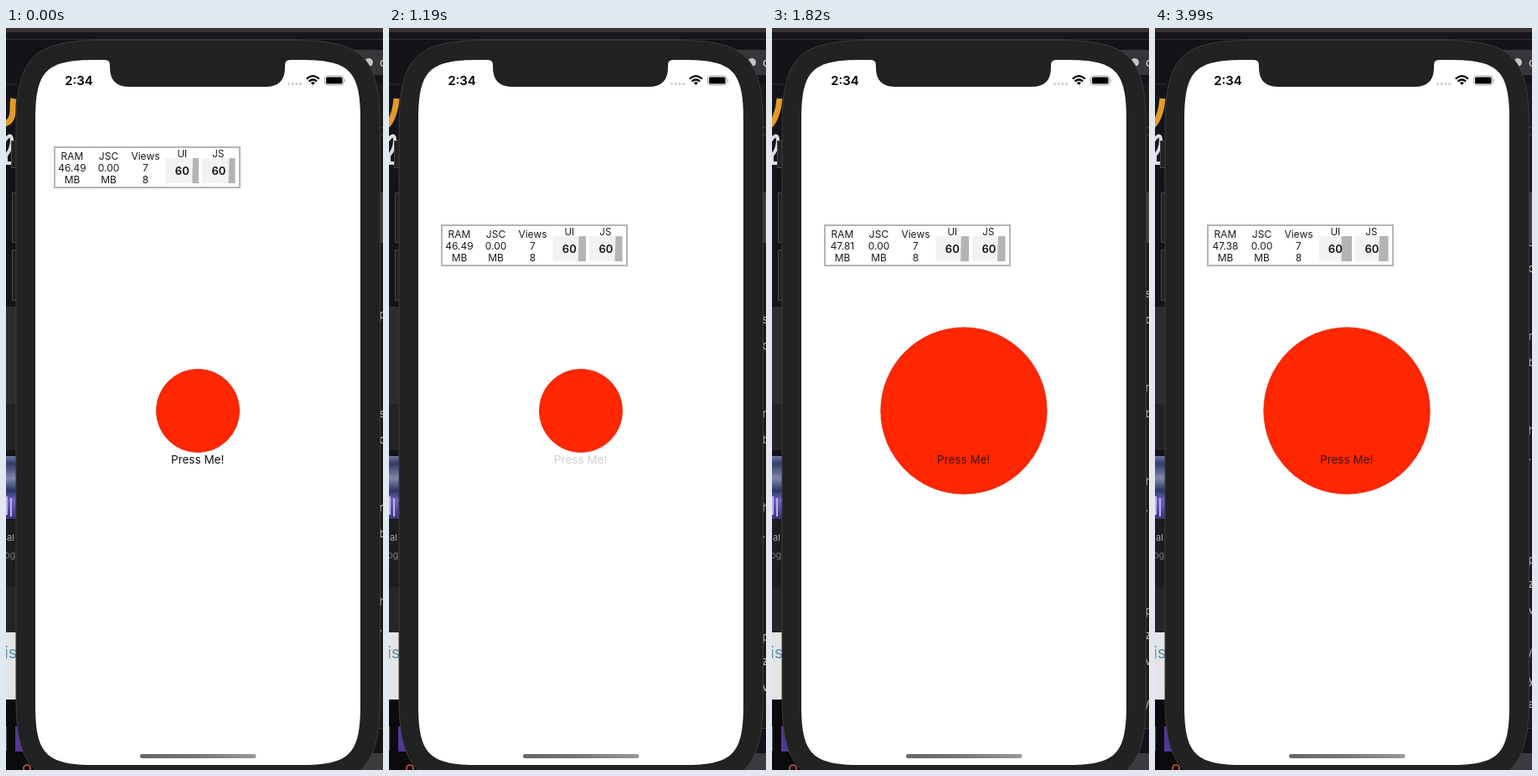
Animation, 450 px wide and 884 px high, one loop 4060 ms. Source, as an HTML page:

```html
<!DOCTYPE html>
<html lang="en">
<head>
<meta charset="utf-8">
<title>Press Me</title>
<style>
  html, body { margin: 0; width: 100%; height: 100%; overflow: hidden; background: #131318; }
  svg { display: block; width: 450px; height: 884px; }
  text { font-family: Inter, Roboto, sans-serif; }
  #panel text { font-size: 12px; text-anchor: middle; fill: #1a1a1a; }
  #panel .head { font-size: 11.5px; }
  #panel .fps { font-size: 13px; font-weight: 600; fill: #111; }
  #log text { font-size: 13px; fill: #c4c4c4; }
</style>
</head>
<body>
<svg viewBox="0 0 450 884">
  <defs>
    <linearGradient id="homeFill">
      <stop offset="0" stop-color="#666"/><stop offset=".5" stop-color="#777"/><stop offset="1" stop-color="#999"/>
    </linearGradient>
    <linearGradient id="photo" x2="0" y2="1">
      <stop offset="0" stop-color="#6d76a5"/><stop offset=".12" stop-color="#343b68"/><stop offset=".35" stop-color="#8188aa"/>
      <stop offset=".55" stop-color="#2c3763"/><stop offset=".7" stop-color="#7163bd"/><stop offset="1" stop-color="#3b3275"/>
    </linearGradient>
    <clipPath id="logArea"><rect x="440" y="257" width="10" height="575"/></clipPath>
    <filter id="soft"><feGaussianBlur stdDeviation=".7"/></filter>
  </defs>

  <!-- desktop behind the phone -->
  <rect width="450" height="884" fill="#131318"/>
  <rect width="450" height="5" fill="#393233"/>
  <rect y="5" width="450" height="10" fill="#17161b"/>
  <path d="M0 13.5H450M0 67H14" stroke="#302f35"/>
  <g filter="url(#soft)">
    <path id="swoosh" fill="none" stroke="#e39a27" stroke-width="7"/>
    <path d="M-2 135Q6 123 7 133Q7 144 0 152V161H7" fill="none" stroke="#ddd" stroke-width="4"/>
    <rect y="332" width="14" height="116" fill="#2d2d2e"/>
    <rect y="448" width="14" height="55" fill="#222224"/>
    <rect y="510" width="12" height="75" fill="url(#photo)"/>
    <path d="M1 558V580M6 560V582" stroke="#b9b0ef" stroke-width="2"/>
    <rect y="586" width="14" height="80" fill="#1d1d20"/>
    <rect y="666" width="14" height="54" fill="#252526"/>
    <text x="1" y="611" font-size="11" fill="#aaa">al</text>
    <text x="-2" y="632" font-size="11" fill="#777">og</text>
    <rect y="720" width="13" height="80" fill="#e4e4e4"/>
    <text x="-2" y="751" font-size="20" fill="#5b91ad">is</text>
  </g>
  <rect x="0" y="800" width="40" height="84" fill="#0b0b0d"/>
  <rect x="-4" y="832" width="5" height="29" fill="#555"/>
  <rect x="11" y="832" width="20" height="30" fill="#50389a"/>
  <circle cx="25" cy="882" r="4" fill="none" stroke="#d95a50" stroke-width="1.6"/>
  <rect x="410" y="26" width="40" height="30" fill="#37373a"/>
  <circle cx="433" cy="41" r="5" fill="#c4c4c4"/>
  <text x="446" y="46" font-size="14" fill="#ddd">c</text>
  <rect x="440" y="66" width="10" height="768" fill="#1b1b1d"/>
  <path d="M444 118.5h6M444 127.5h6M444 834.5h6" stroke="#39393c"/>
  <rect x="425" y="864" width="25" height="20" fill="#3c3c3f"/>
  <g clip-path="url(#logArea)"><g id="log"></g></g>

  <!-- phone -->
  <g fill="#222224" stroke="#48484a">
    <rect x="6.5" y="134.5" width="10" height="32"/>
    <rect x="7.5" y="196.5" width="10" height="59"/>
    <rect x="7.5" y="264.5" width="10" height="60"/>
    <rect x="440" y="196.5" width="9.5" height="59" fill="#3a3a3c"/>
  </g>
  <path id="body" fill="#222223" stroke="#3c3c3e"/>
  <path id="screen" fill="#fff"/>
  <path d="M118 37V38Q124 38 124 44V47Q124 70 147 70H310Q333 70 333 47V44Q333 38 339 38V37Z" fill="#222223"/>

  <!-- status bar -->
  <text x="87" y="68" font-size="15" font-weight="600" text-anchor="middle">2:34</text>
  <path d="M337.5 66.5h16" stroke="#c8c8c8" stroke-width="3" stroke-linecap="round" stroke-dasharray="0 4.7"/>
  <g fill="none" stroke="#000" stroke-width="2.2">
    <path d="M358.8 60.6Q366.3 53.8 373.8 60.6M361.6 63.6Q366.3 59.4 371 63.6"/>
    <path d="M366.3 68l-2.5-2.7q2.5-2 5 0Z" fill="#000" stroke="none"/>
  </g>
  <rect x="380.5" y="57" width="22.5" height="11" rx="3" fill="none" stroke="#a5a5a5"/>
  <rect x="382" y="58.5" width="19.5" height="8" rx="1.6"/>
  <path d="M404.2 60.5q2 2 0 4Z" fill="#a5a5a5"/>

  <!-- app -->
  <circle id="ball" cx="229" cy="456" fill="#ff2600" stroke="#d9341c" stroke-width=".8"/>
  <text id="label" x="228.7" y="519" font-size="13.5" text-anchor="middle" fill="#111">Press Me!</text>
  <g id="panel">
    <rect x="1" y="1" width="221" height="48" fill="#fff" stroke="#b5b5b5" stroke-width="2"/>
    <text x="22" y="15.5">RAM</text><text id="ram" x="22" y="29.5"></text><text x="22" y="43.5">MB</text>
    <text x="65.5" y="15.5">JSC</text><text x="65.5" y="29.5">0.00</text><text x="65.5" y="43.5">MB</text>
    <text x="109.5" y="15.5">Views</text><text x="109.5" y="29.5">7</text><text x="109.5" y="43.5">8</text>
    <text class="head" x="153.3" y="12.8">UI</text>
    <text class="head" x="196.3" y="12.8">JS</text>
    <rect x="133.5" y="14" width="39.5" height="30" fill="#f2f2f2"/>
    <rect x="177" y="14" width="39.5" height="30" fill="#f2f2f2"/>
    <path id="uiGraph" fill="#b4b4b4"/><path id="jsGraph" fill="#b4b4b4"/>
    <text class="fps" x="153.3" y="34">60</text>
    <text class="fps" id="jsFps" x="197" y="34"></text>
  </g>
  <rect x="160" y="865" width="138.5" height="5" rx="2.5" fill="url(#homeFill)"/>
</svg>
<script>
const LOOP = 4060, STEP = 70;
const $ = id => document.getElementById(id);

// [time, value] tables; hold() jumps, blend() interpolates
const SCROLL = [[0, 0], [630, -82], [980, -112], [1330, -143], [2240, -174], [3360, -204]];
const RAM = [[0, '46.49'], [1330, '47.81'], [2310, '47.39'], [3360, '47.38']];
const JS_FPS = [[0, '60'], [2310, '22'], [2800, '60']];
const SWOOSH = [
  [0, 'M-2 114Q8 112 8 98Q8 88 9 84'],
  [280, 'M-2 114Q9 112 8 97Q6 90 -1 89'],
  [700, 'M-2 116Q7 106 9 84']
];
const FADE = [[0, 1], [980, 1], [1120, 0.2], [1260, 0.2], [1510, 0.8], [LOOP, 0.8]];

// rows of the log behind the phone: letter and baseline
const LINES = [['p', 346], ['s', 464], ['d', 495], ['m', 576], ['b', 607], ['h', 688], ['.', 719],
  ['p', 842], ['z', 871], ['v', 902], ['/', 954], ['y', 985], ['a', 1014]];
$('log').innerHTML = LINES.map(([c, y]) => `<text x="445.5" y="${y}">${c}</text>`).join('');

// rectangle whose corners ease gradually into the sides
function smoothRect(x, y, w, h, radius) {
  const e = radius * 1.528, c = radius * 0.27, d = e - c;
  return `M${x} ${y + e}c0 ${-d} ${d} ${-e} ${e} ${-e}`
    .replace(`${d} ${-e} ${e}`, `${c} ${-e} ${e}`) && [
    `M${x} ${y + e}C${x} ${y + c} ${x + c} ${y} ${x + e} ${y}`,
    `H${x + w - e}C${x + w - c} ${y} ${x + w} ${y + c} ${x + w} ${y + e}`,
    `V${y + h - e}C${x + w} ${y + h - c} ${x + w - c} ${y + h} ${x + w - e} ${y + h}`,
    `H${x + e}C${x + c} ${y + h} ${x} ${y + h - c} ${x} ${y + h - e}Z`
  ].join('');
}
$('body').setAttribute('d', smoothRect(12, 14.5, 434.5, 887, 70));
$('screen').setAttribute('d', smoothRect(35, 38, 388, 840, 47));

const clamp = x => Math.min(1, Math.max(0, x));
const easeInOut = x => x < 0.5 ? 2 * x * x : 1 - 2 * (1 - x) ** 2;
const hold = (keys, t) => keys.filter(k => k[0] <= t).pop()[1];

function blend(keys, t) {
  const i = Math.max(1, keys.findIndex(k => k[0] > t));
  const [t0, a] = keys[i - 1], [t1, b] = keys[i];
  return a + (b - a) * clamp((t - t0) / (t1 - t0));
}

// filled history growing leftwards from the right edge
const graph = (right, width, slant) =>
  `M${right} 14V44H${right - width}L${right - width + slant} 14Z`;

function draw(t) {
  const drag = easeInOut(clamp(t / 380));
  $('panel').setAttribute('transform', `translate(${57 + 5 * drag} ${141 + 93 * drag})`);
  $('ram').textContent = hold(RAM, t);
  $('jsFps').textContent = hold(JS_FPS, t);
  $('uiGraph').setAttribute('d', graph(173, 7.8 + t * 0.00115, t < 3000 ? 0.8 : 0));
  $('jsGraph').setAttribute('d', graph(216.5, 7.9 + t * 0.0009, 1));

  const grow = easeInOut(clamp((t - 1268) / 500));
  $('ball').setAttribute('r', 49.6 * (1 + grow));
  $('label').setAttribute('opacity', blend(FADE, t));

  $('log').setAttribute('transform', `translate(0 ${hold(SCROLL, t)})`);
  $('swoosh').setAttribute('d', hold(SWOOSH, t));
}

const start = performance.now();
function tick() {
  const t = (performance.now() - start) % LOOP;
  draw(Math.floor(t / STEP) * STEP);
  requestAnimationFrame(tick);
}
tick();
</script>
</body>
</html>
```
